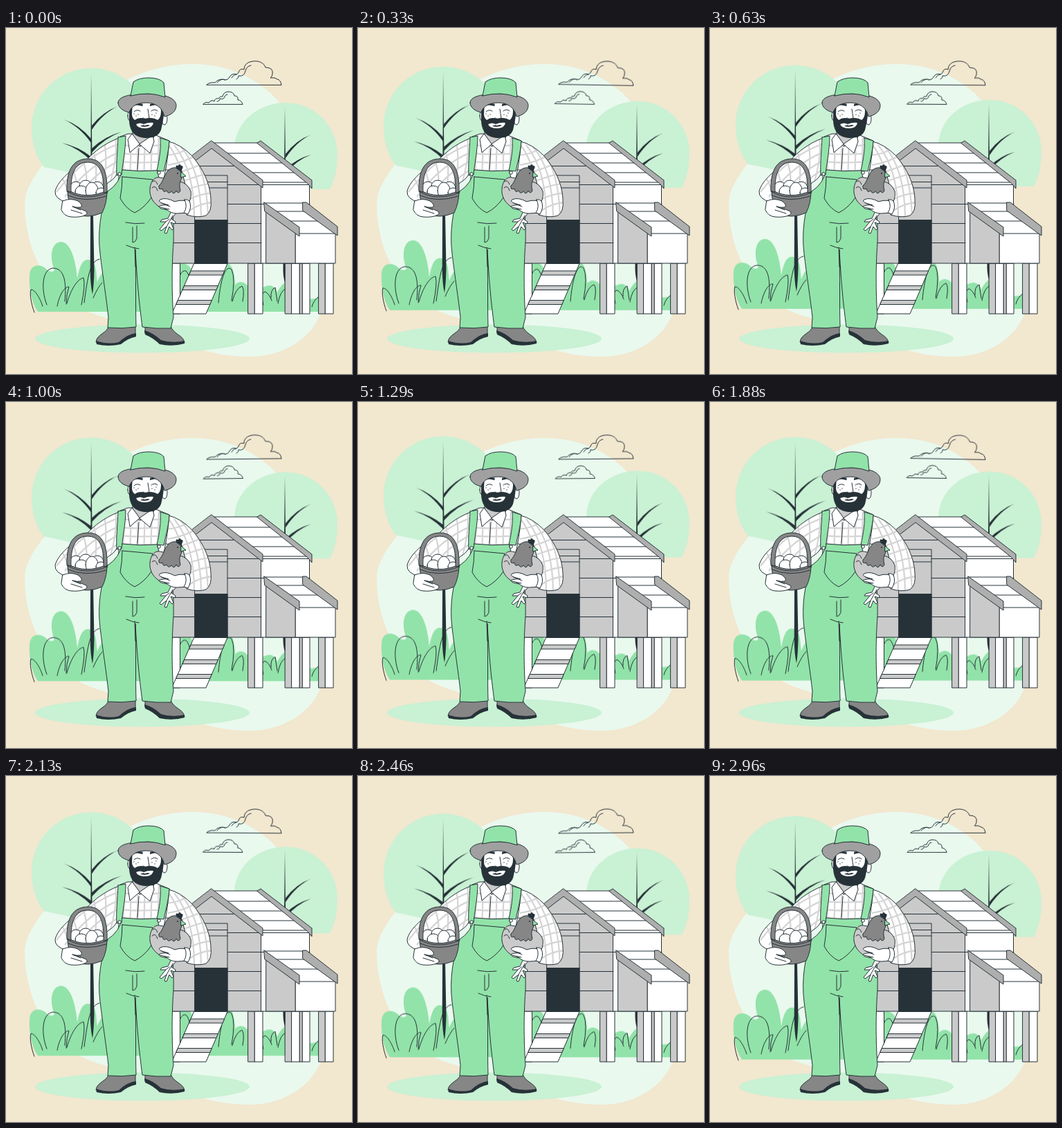
Animation of 500x500 px, one loop 3000 ms. Source, as an HTML page:

```html
<!DOCTYPE html>
<html lang="en">
<head>
<meta charset="utf-8">
<title>Farmer with a hen</title>
<style>
html, body { margin: 0; width: 100%; height: 100%; overflow: hidden; background: #f2e7cf; }
svg { display: block; width: 100vw; height: 100vh; }
.l { stroke: #263238; stroke-width: 1; stroke-linecap: round; stroke-linejoin: round; }
.n { fill: none; }
.w { fill: #fff; }
.g { fill: #92e3a9; }
.p { fill: #c9f1d4; }
.s { fill: #cacaca; }
.m { fill: #aeaeae; }
.h { fill: #a0a0a0; }
.d { fill: #868686; }
.k { fill: #263238; }
.plaid { fill: none; stroke: #d4d4d4; stroke-width: 2.2; }
#clouds { transform-origin: 344px 79px; }
</style>
</head>
<body>
<svg id="stage" viewBox="0 0 500 500">
  <defs>
    <clipPath id="shirtClip"><path d="M165 157L176 153L212 153L236 163Q233 200 226 225L163 225Z"/></clipPath>
    <clipPath id="leftClip"><path d="M163 159C140 168 128 179 117 190C96 203 75 220 71 236Q70 247 88 252L120 250L147 224Q160 216 161 208Z"/></clipPath>
    <clipPath id="rightClip"><path d="M235 164Q252 168 268 184C285 203 295 226 296 247Q298 265 289 271Q277 275 261 270L264 245L254 207L231 205Z"/></clipPath>
  </defs>
  <path fill="#e9f9ee" d="M27 250C30 229 43 208 70 177C105 120 170 52 270 52C335 52 380 86 399 113C420 145 436 190 436 250C438 310 470 360 455 411C443 447 402 475 352 475C300 475 270 461 235 446C190 426 140 424 100 401C55 373 26 315 27 250Z"/>
  <ellipse class="p" cx="197" cy="449" rx="155" ry="20.5"/>
  <g id="plants"></g>
  <g id="clouds"></g>
  <g id="coop"></g>
  <g id="man"></g>
</svg>
<script>
const $ = id => document.getElementById(id);
const draw = (id, parts) => {
  $(id).innerHTML = parts.map(([c, d, extra = '']) => `<path class="${c}" d="${d}" ${extra}/>`).join('');
};
const box = (x, y, w, h) => `M${x} ${y}h${w}v${h}h${-w}Z`;
const oval = (x, y, rx, ry) => `M${x - rx} ${y}a${rx} ${ry} 0 1 1 ${2 * rx} 0a${rx} ${ry} 0 1 1 ${-2 * rx} 0Z`;
const rule = (x1, x2, y) => `M${x1} ${y}H${x2}`;
// Thin branch, arching from the trunk to a pointed tip
const branch = (x, y, tx, ty) => {
  const mx = x + (tx - x) * .42, my = y + (ty - y) * .72;
  return `M${x} ${y - 3}Q${mx} ${my - .8} ${tx} ${ty}Q${mx} ${my + 1.6} ${x} ${y + 3}Z`;
};

draw('plants', [
  ['p', 'M123 58A86 86 0 0 1 209 144Q209 190 180 213Q140 213 105 212Q76 205 55 201C43 187 37 166 37 144A86 86 0 0 1 123 58Z'],
  ['p', 'M404 108C447 108 479 143 479 183C479 203 475 220 468 233L350 233Q330 205 330 172C332 135 365 108 404 108Z'],
  ['g', 'M46 410C36 396 33 373 34 357C35 341 50 340 59 349Q66 355 70 350C62 329 66 309 80 309C94 310 101 337 103 362Q108 332 120 335C132 337 130 357 132 367Q138 350 150 348L240 348Q252 334 263 343C273 351 273 370 276 375Q284 352 296 344C306 335 322 336 327 347Q331 357 331 371Q340 362 350 373L366 382Q370 372 382 372Q390 374 392 382Q397 371 409 363Q420 360 422 374Q434 370 436 390Q444 394 453 388L462 410Z'],
  ['l n', 'M41 411C36 398 34 383 36 378C42 378 49 390 53 402M59 400C50 377 52 347 69 347C83 348 88 364 85 395M74 402C77 386 84 374 91 374Q87 385 87 399M88 398C94 377 103 363 112 361Q115 371 109 400M113 397C118 360 121 337 135 334M126 390Q133 374 139 368'],
  ['l n', 'M251 398C246 366 251 349 260 351Q270 361 266 397M275 399Q278 376 287 369M307 397C310 361 318 341 326 349Q332 362 326 394M327 395Q332 376 341 373Q345 377 342 395M372 400Q367 383 374 381Q380 383 384 394M383 390Q382 378 389 375L392 395M393 398Q396 380 404 377M418 396Q416 375 423 372Q428 378 427 394M442 403Q444 394 452 388'],
  ['k', 'M123 66L124.5 190L127.5 350Q127 372 125 385Q122 373 121.7 350L122.4 190Z'],
  ['k', branch(124, 144, 162, 113)], ['k', branch(123, 163, 83, 132)],
  ['k', branch(124, 177, 167, 150)], ['k', branch(123, 189, 81, 166)],
  ['k', 'M403 114L404 200L406 345Q405 359 403 368Q400 358 400.5 345L402 200Z'],
  ['k', branch(404, 185, 441, 154)], ['k', branch(404, 207, 441, 183)]
]);

draw('clouds', [
  ['l n', 'M290 82Q294 78 302 79Q308 72 317 75Q321 75 323 71Q326 65 333 67Q336 66 337 62Q339 58 344 60Q344 51 354 48.500C366 46 373 51 375 57Q387 57 385 67Q384 71 382 72Q389 71 392 74Q397 75 398 82Z'],
  ['l n', 'M305 79Q311 72 317 75M326 72Q329 67 333 67M333 74Q337 72 336 69Q344 71 346 62Q348 55 354 54'],
  ['l n', 'M285 110Q288 106 293 108Q297 103 301 106Q302 101 307 102Q309 98 313 99Q314 93 321 92Q329 92 330 98Q336 98 335 104Q340 104 342 110Z'],
  ['l n', 'M305 106Q309 106 309 102Q315 104 316 99Q317 96 320 96']
]);

const post = x => [['l s', box(x, 340, 9.5, 73)], ['l w', box(x + 9.5, 340, 11.5, 73)]];
draw('coop', [
  ...post(350), ...post(403.5),
  ['l s', box(424.5, 340, 4, 73)], ['l w', box(428.5, 340, 10.5, 73)],
  ...post(452),
  ['l w', box(239.5, 340, 12, 73)],
  ['l w', box(368.5, 222, 70, 118)],
  ['l n', rule(369, 439, 254.5) + rule(369, 439, 226.5)],
  ['l s', 'M297 172L368.500 228V340H238V215Z'],
  ['l n', rule(267, 329, 199.5) + rule(240, 273, 226.5) + rule(320, 369, 226.5)
    + [254.5, 282.5, 310.5].map(y => rule(240, 273, y) + rule(320, 369, y)).join('')],
  ['l s', box(273, 213, 47, 127)],
  ['l n', rule(273, 320, 222.5) + rule(273, 320, 231)],
  ['k', box(273, 277, 47.5, 63)],
  ['l w', 'M298 166H367L442 223H372Z'],
  ['l n', rule(317, 386, 181) + rule(336, 405, 195) + rule(354, 423, 209)],
  ['l m', 'M297 163L371 220V231L297 174L246 213L240 207Z'],
  ['l m', 'M363 166L368 163L442 220V232L436 225Z'],
  ['l s', 'M376 264L418.500 296V340H376Z'],
  ['l w', box(418.5, 295, 57.5, 45)],
  ['l w', 'M374 253H429L478 297H424Z'],
  ['l n', rule(391, 433, 265) + rule(408, 452, 279)],
  ['l m', 'M373 252L424 288V301L374 265Z'],
  ['l m', 'M429 252H434L479 287V300L429 264Z'],
  ['l w', 'M272 340.500H320L289 413H240Z'],
  ...[351, 372.5, 393.5].map(y => {
    const a = 272 - (y - 341) * .444, b = 320 - (y - 341) * .431;
    return ['l s', `M${a} ${y}H${b}L${b - 2.6} ${y + 6}H${a - 2.7}Z`];
  })
]);

const shirtLines = [171, 181, 191, 201, 211, 221].map(x => `M${x} 155L${x - 2} 225`).join('')
  + [168, 180, 192, 204].map(y => `M155 ${y}Q195 ${y + 5} 240 ${y}`).join('');
const leftLines = [0, 1, 2, 3, 4, 5].map(i => `M${158 - i * 16} ${153 + i * 12}Q${162 - i * 14} ${184 + i * 9} ${151 - i * 12} ${222 + i * 8}`).join('')
  + [0, 1, 2, 3].map(i => `M165 ${167 + i * 12}Q${115 + i * 6} ${183 + i * 13} ${73 + i * 12} ${237 + i * 7}`).join('');
const rightLines = [0, 1, 2, 3, 4, 5, 6].map(i => `M${229 + i * 5} ${184 + i * 14}Q${254 + i * 5} ${183 + i * 11} ${270 + i * 6} ${169 + i * 14}`).join('')
  + [0, 1, 2, 3].map(i => `M${234 + i * 9} ${167 + i * 2}Q${263 + i * 9} ${208 - i * 3} ${262 + i * 10} 273`).join('');

// Checked cloth: white base, clipped lines, then the outline
const cloth = (id, lines) => {
  const d = $(id).firstElementChild.getAttribute('d');
  return [['w', d], ['plaid', lines, `clip-path="url(#${id})"`], ['l n', d]];
};
const dots = [[185, 124], [188, 127], [191, 125], [211, 125], [215, 127], [217, 123]];

draw('man', [
  ...cloth('leftClip', leftLines),
  ...cloth('rightClip', rightLines),
  ...cloth('shirtClip', shirtLines),
  ['l n', 'M192 174L190 205'],
  ['l s', 'M183 148H217L211 164L193 171L184 160Z'],
  ['l w', 'M182 153L176 161L179 180L193 168Z'], ['l w', 'M212 155L214 164L208 181L193 168Z'],
  // shoes
  ['l d', 'M148 431C147 441 131 442 130 454Q146 460 165 456Q174 447 187 444L187 431Z'],
  ['k', 'M130 452Q148 458 163 454Q176 442 188 441V446Q177 448 166 457Q148 461 131 457Z'],
  ['l d', 'M201 431V441Q213 445 222 453Q238 460 258 455C257 444 242 443 238 431Z'],
  ['k', 'M200 437Q212 440 224 451Q240 456 258 452V456Q240 461 222 457Q213 448 201 443Z'],
  // overalls
  ['l g', 'M168 205Q193 208 219 206C220 220 229 237 237 250Q243 266 242 310C239 350 240 390 242 418L238 434Q218 435 197 432C192 395 189 360 187 320C188 360 187 400 188 432Q168 435 147 433L148 418C145 390 140 360 136 326C132 295 137 262 147 236Q164 225 168 205Z'],
  ['l n', 'M173 281Q187 284 200 282M189 286V304Q187 310 183 310V288M174 314Q182 318 192 319M186 317L187 345'],
  ['l n', 'M168 215L212 219Q208 234 210 245Q200 260 186 267Q173 261 165 246Q168 231 168 215Z'],
  ['l g', 'M162 158L173 156C173 176 168 199 167 212L160 213C159 199 161 178 162 158Z'],
  ['l g', 'M223 159L236 163C235 181 230 196 228 207L218 206C222 189 224 174 223 159Z'],
  ['l w', oval(164, 211, 2.3, 2.3)], ['l w', oval(221, 209, 2.3, 2.3)],
  // head
  ['l w', oval(229, 131, 4, 9)], ['l w', oval(179, 127, 3, 7)],
  ['l w', 'M180 106H227L225 139Q217 153 204 154Q187 153 180 139Z'],
  ['k', 'M178 109L183 106L182 124Q182 130 186 133Q192 128 201 131Q212 128 219 133Q224 130 224 120L223 107L228 111Q229 128 225 143Q223 159 202 159C182 158 177 145 178 126Z'],
  ['w', 'M188 139Q194 136 199 139Q206 136 213 137Q212 144 202 145Q190 145 188 139Z'],
  ['k', 'M194 142Q198 139 201 141Q205 139 208 141Q202 144 194 142Z'],
  ['k', 'M183 113Q188 107 198 110L197 113Q189 110 183 113ZM208 110Q217 106 222 112Q216 110 208 113Z'],
  ['l n', 'M185 121Q189 117 194 120M210 120Q215 116 219 120M205 117Q206 124 207 130Q202 133 198 130'],
  ...dots.map(([x, y]) => ['k', oval(x, y, .65, .65)]),
  // hat
  ['l h', 'M162 108C162 99 179 95 204 95C231 95 246 102 246 112C246 121 238 126 229 128C226 114 215 108 203 108C189 108 181 113 178 122C169 120 162 115 162 108Z'],
  ['l g', 'M180 98L184 78Q192 72 206 72Q222 72 228 79L230 100Q207 91 180 98Z'],
  // basket
  ['l w', oval(101, 231, 9, 9)], ['l w', oval(132, 232, 9, 10)], ['l w', oval(115, 228, 9, 8)],
  ['l w', oval(109, 236, 9, 8)], ['l w', oval(124, 235, 9, 12)], ['l w', oval(137, 238, 7, 7)],
  ['l d', 'M89 234Q115 249 146 235Q146 253 139 267Q119 276 98 269Q89 253 89 234Z'],
  ['l d', 'M88 235C87 202 99 189 119 189C138 189 147 205 146 237L141 238C142 207 134 194 118 194C101 194 93 208 94 237Z'],
  ['l n', 'M88 236Q113 251 146 238M90 242Q114 253 145 243'],
  ['l w', 'M82 250Q93 245 104 250Q112 256 108 259Q102 260 96 258Q108 261 116 265Q119 269 113 271Q106 274 94 273Q84 272 80 263Z'],
  ['l n', 'M96 258L108 263M94 263L110 268'],
  // hen
  ['l w', 'M239 265L234 275L225 277L223 280L231 280L222 291L224 293L232 287L229 296L232 297L236 287L240 292L242 290L238 281L244 283L245 280L239 276L247 266Z'],
  ['l n', 'M241 271L232 287M236 276L231 280'],
  ['l s', 'M222 216C213 214 207 225 208 238C211 257 229 265 245 264C261 262 269 250 267 236Q263 225 252 222Z'],
  ['l d', 'M235 205Q243 199 251 204Q256 209 254 217Q249 225 252 235Q249 241 246 235Q243 242 239 236Q235 241 232 235Q227 239 226 232Q220 235 221 228C227 223 229 211 235 205Z'],
  ['k', 'M246 203Q244 197 249 199Q251 195 253 199Q257 199 255 203L253 208Z'],
  ['l g', 'M253 208L260 214L253 216Z'], ['k', oval(248, 210, 1.1, 1.1)],
  ['l n', 'M212 222Q216 218 219 226M211 231Q216 226 219 235'],
  ['l w', 'M262 250Q251 248 244 251Q231 244 223 248Q219 250 225 253L235 256Q225 255 221 258Q222 262 232 262Q238 268 247 268L262 267Z'],
  ['l n', 'M225 253L237 258M223 259L236 262'],
  ['l w', 'M258 248Q262 247 265 250Q269 259 263 269L257 267Q263 258 258 248Z']
]);

const loop = (id, duration, frames) => $(id).animate(frames, { duration, iterations: Infinity, easing: 'linear' });
loop('plants', 3000, [0, -10, 0].map(y => ({ transform: `translateY(${y}px)` })));
loop('clouds', 1500, [[0, 0], [.25, 1], [.75, -1], [1, 0]].map(
  ([offset, a]) => ({ offset, transform: `rotate(${a}deg)` })));
</script>
</body>
</html>
```
